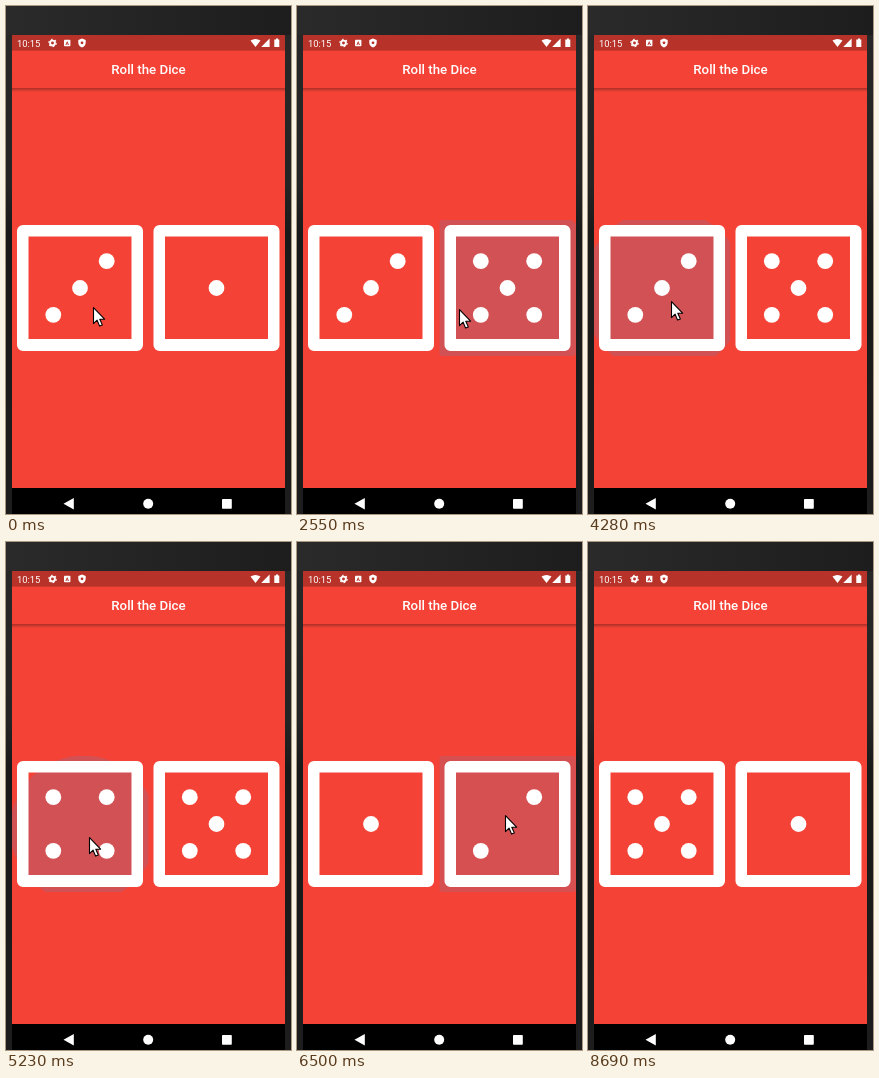
An HTML page for the animation above (9380 ms loop, 285 px wide and 508 px high).

```html
<!DOCTYPE html>
<html lang="en">
<head>
<meta charset="utf-8">
<title>Roll the Dice</title>
<style>
  html, body { margin: 0; width: 100%; height: 100%; overflow: hidden; background: #1c1c1c; }
  svg { display: block; width: 285px; height: 508px; }
  text { font-family: Roboto, sans-serif; fill: #fff; }
</style>
</head>
<body>
<svg viewBox="0 0 285 508">
  <defs>
    <linearGradient id="desk" x1="0" y1="0" x2="1" y2="0">
      <stop offset="0" stop-color="#2a2a2a"/><stop offset="1" stop-color="#1d1d1d"/>
    </linearGradient>
    <linearGradient id="side" x1="0" y1="0" x2="0" y2="1">
      <stop offset="0" stop-color="#282828"/><stop offset=".35" stop-color="#242424"/>
      <stop offset=".45" stop-color="#191919"/><stop offset="1" stop-color="#1d1d1d"/>
    </linearGradient>
    <linearGradient id="shade" x1="0" y1="0" x2="0" y2="1">
      <stop offset="0" stop-opacity=".3"/><stop offset="1" stop-opacity="0"/>
    </linearGradient>
    <clipPath id="button"><rect x="6" y="214" width="136.3" height="136" rx="3"/></clipPath>
    <path id="frame" fill="#fff" fill-rule="evenodd"
      d="M17 219H131a6 6 0 0 1 6 6V339a6 6 0 0 1-6 6H17a6 6 0 0 1-6-6V225a6 6 0 0 1 6-6ZM22.5 230.5V333H125.5V230.5Z"/>
  </defs>

  <rect width="285" height="508" fill="url(#side)"/>
  <rect width="285" height="29" fill="url(#desk)"/>

  <rect x="6" y="29" width="273" height="479" fill="#f44336"/>
  <rect x="6" y="29" width="273" height="15.6" fill="#b73229"/>
  <rect x="6" y="82" width="273" height="4" fill="url(#shade)"/>
  <text x="142.5" y="68" font-size="13.3" font-weight="500" text-anchor="middle">Roll the Dice</text>

  <text x="11" y="40.5" font-size="9.4">10:15</text>
  <g fill="none" stroke="#fff">
    <circle cx="46.5" cy="37" r="2.4" stroke-width="1.9"/>
    <circle cx="46.5" cy="37" r="3.7" stroke-width="1.1" stroke-dasharray="1.7 2.17"/>
  </g>
  <g fill="#fff">
    <rect x="58" y="33.7" width="6.4" height="6.6" rx=".8"/>
    <path d="M76 32.5L79.7 34V37Q79.4 40 76 41.5Q72.6 40 72.3 37V34Z"/>
    <path d="M244.5 34.6Q249.5 31.2 254.5 34.6L249.5 41Z"/>
    <path d="M263.6 32.6V41H255.2Z"/>
    <path d="M269.3 33.4H270V32.5H272V33.4H273.3V41H268.3V33.4Z"/>
  </g>
  <g fill="#b73229">
    <path d="M61.2 35L63 39H62L61.2 37.2L60.4 39H59.4Z"/>
    <circle cx="76" cy="36.8" r="1.4"/>
  </g>

  <g class="die"></g>
  <g class="die" transform="translate(136.5)"></g>

  <rect x="6" y="482" width="273" height="26"/>
  <g fill="#fff">
    <path d="M57.5 497.7L67.8 492V503.4Z"/>
    <circle cx="142.2" cy="497.7" r="5"/>
    <rect x="216" y="493" width="9.8" height="9.8" rx=".8"/>
  </g>

  <path id="cursor" d="M.5 .7V16.6L4.1 13.2L6.6 19.1L9.3 17.9L6.8 12.2H11.6Z"
    fill="#fff" stroke="#000" stroke-width="1.1" stroke-linejoin="round"/>
</svg>
<script>
const LOOP = 9380;
const GLIDE = 240;                // cursor travel time
const ROLL = 100;                 // delay from tap to new face
const GROW = 200, LIFE = 350;     // ripple timing
const CENTER = { x: 74, y: 282 }; // middle of a die
const OFFSET = 136.5;             // distance between the dice

// Runs of evenly spaced taps; each digit is the face rolled.
const taps = [
  ...run(1, 1000, 0, '5', false),
  ...run(1, 1640, 380, '365'),
  ...run(0, 3060, 345, '253'),
  ...run(0, 4182, 324, '6141'),
  ...run(1, 6190, 470, '261'),
  ...run(0, 7760, 270, '425')
];
const firstFace = [3, 1];

// Where the cursor rests, and when it sets off for that place.
const stops = [
  { at: -GLIDE, x: 87, y: 301 },
  { at: 80, x: 162, y: 303 },
  { at: 2670, x: 83, y: 295 },
  { at: 5600, x: 208, y: 273 },
  { at: 7240, x: 59, y: 289 },
  { at: 8450, x: 80, y: 508 }
];

function run(die, from, step, faces, ink = true) {
  return [...faces].map((face, i) => ({ die, at: from + i * step, face: +face, ink }));
}

const mix = (a, b, k) => a + (b - a) * k;
const clamp = v => Math.min(1, Math.max(0, v));

function add(parent, name, attrs) {
  const el = document.createElementNS('http://www.w3.org/2000/svg', name);
  set(el, attrs);
  return parent.appendChild(el);
}

function set(el, attrs) {
  for (const k in attrs) el.setAttribute(k, attrs[k]);
}

function show(el, on) {
  el.style.display = on ? '' : 'none';
}

// Column, row, and the rule for the faces that show the pip.
const pips = [
  [0, 0, n => n % 2 === 1],
  [1, -1, n => n > 1], [-1, 1, n => n > 1],
  [-1, -1, n => n > 3], [1, 1, n => n > 3],
  [-1, 0, n => n === 6], [1, 0, n => n === 6]
];

const dice = [...document.querySelectorAll('.die')].map(g => {
  const button = add(g, 'g', { 'clip-path': 'url(#button)' });
  const ink = add(button, 'circle', { fill: '#2196f3' });
  add(g, 'use', { href: '#frame' });
  const dots = pips.map(([x, y, on]) => ({
    on,
    el: add(g, 'circle', { cx: CENTER.x + 26.7 * x, cy: CENTER.y + 26.8 * y, r: 7.9, fill: '#fff' })
  }));
  return { ink, dots };
});
const cursor = document.getElementById('cursor');

function cursorAt(t) {
  const i = stops.findLastIndex(s => s.at <= t);
  const to = stops[i], from = stops[i - 1] || to;
  const k = clamp((t - to.at) / GLIDE), e = k * k * (3 - 2 * k);
  return { x: mix(from.x, to.x, e), y: mix(from.y, to.y, e) };
}

// The ripple drifts from the tap to the middle of the button as it grows.
function drawInk(ink, die, tap, t) {
  const age = tap ? t - tap.at : LIFE;
  show(ink, age < LIFE);
  if (age >= LIFE) return;
  const from = cursorAt(tap.at);
  const k = 1 - (1 - clamp(age / GROW)) ** 2;
  set(ink, {
    cx: mix(from.x - die * OFFSET, CENTER.x, k),
    cy: mix(from.y, CENTER.y, k),
    r: mix(29, 101, k),
    opacity: 0.165 * (1 - (age / LIFE) ** 16)
  });
}

function draw(t) {
  dice.forEach(({ ink, dots }, die) => {
    const mine = taps.filter(p => p.die === die);
    const rolled = mine.findLast(p => p.at + ROLL <= t);
    const face = rolled ? rolled.face : firstFace[die];
    for (const d of dots) show(d.el, d.on(face));
    drawInk(ink, die, mine.findLast(p => p.ink && p.at <= t), t);
  });

  const { x, y } = cursorAt(t);
  set(cursor, { transform: `translate(${x} ${y})` });
}

let begin;
function tick(now) {
  begin ??= now;
  draw((now - begin) % LOOP);
  requestAnimationFrame(tick);
}
draw(0);
requestAnimationFrame(tick);
</script>
</body>
</html>
```
